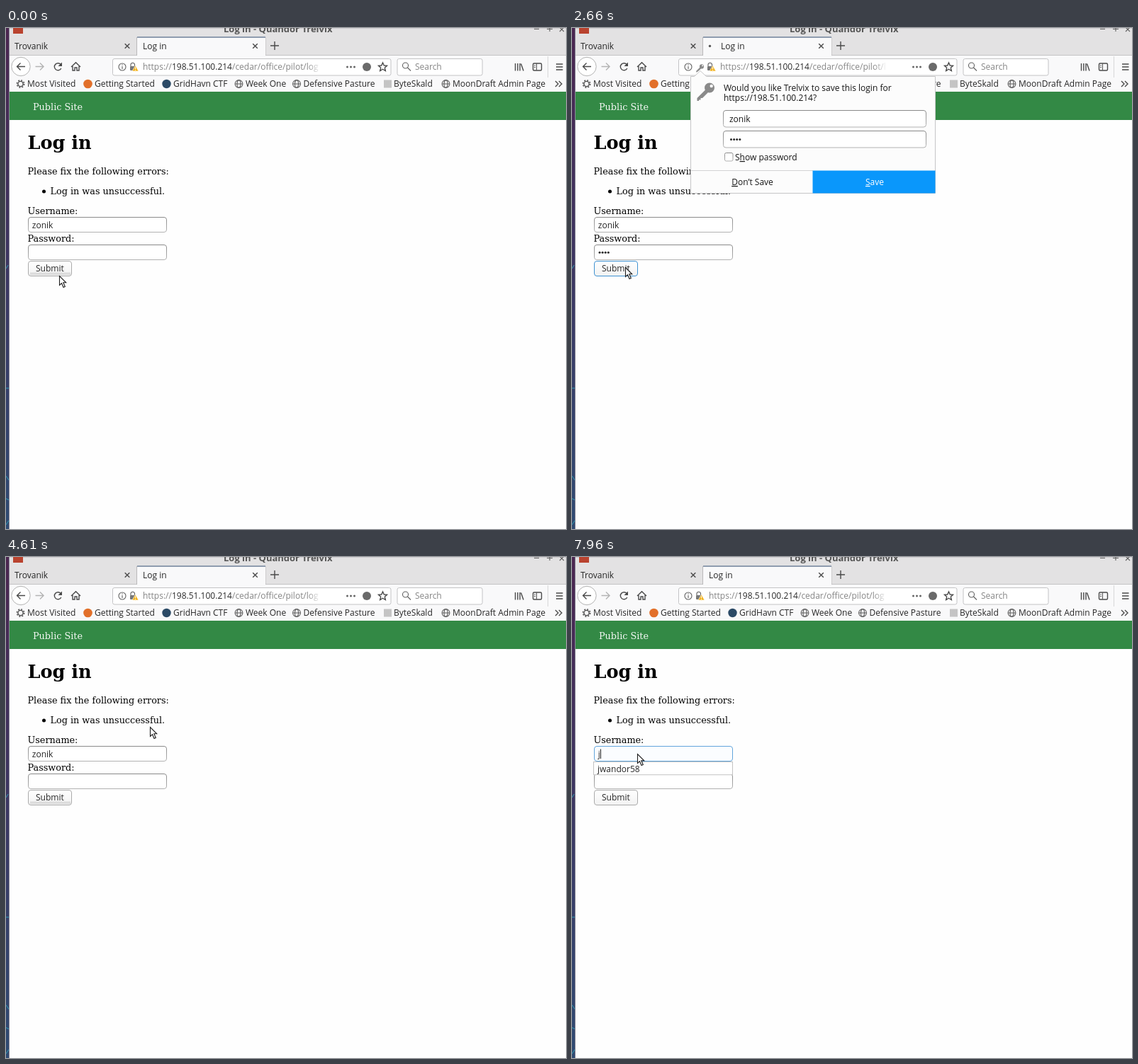
An HTML page that plays this animation: 790 px wide and 708 px high, repeating every 8000 ms.

```html
<!DOCTYPE html>
<html lang="en">
<head>
<meta charset="utf-8">
<title>Log in</title>
<style>
  html, body { margin: 0; width: 100%; height: 100%; overflow: hidden; background: #fefefe; }
  svg { display: block; width: 100%; height: 100%; }
  text { font: 12px "Open Sans", "Noto Sans", sans-serif; fill: #262626; white-space: pre; }
  .title { font-size: 13px; font-weight: 700; fill: #555; }
  .page text { font: 12.8px "DejaVu Serif", serif; fill: #000; }
  .page .h1 { font-size: 25.6px; font-weight: bold; }
  .page .ui { font: 12px "Open Sans", "Noto Sans", sans-serif; fill: #262626; }
  .page .nav { fill: #f4f8f4; }
  #prompt text { fill: #161616; }
  #prompt .light { fill: #fff; }
  .icon { fill: none; stroke: #4a4a4a; stroke-width: 1.4; }
  .thin { fill: none; stroke: #5f5f5f; stroke-width: 1.1; }
  .pale { stroke: #b4b4b4; }
  .box { fill: #fff; stroke: url(#rim); }
  .box.on { fill: #fbfdff; stroke: #62a5dc; }
  text.dim { fill: #858585; }
  .host { fill: #2a2a2a; }
  .u { text-decoration: underline; }
  .caret { stroke: #222; }
</style>
</head>
<body>
<svg viewBox="0 0 790 708">
  <defs>
    <linearGradient id="desk" x2="0" y2="1">
      <stop offset="0" stop-color="#4b2650"/><stop offset=".45" stop-color="#3d3561"/><stop offset="1" stop-color="#2f4a72"/>
    </linearGradient>
    <linearGradient id="fade"><stop offset="0" stop-color="#fff" stop-opacity="0"/><stop offset="1" stop-color="#fff"/></linearGradient>
    <linearGradient id="btn" x2="0" y2="1"><stop offset="0" stop-color="#fff"/><stop offset="1" stop-color="#f2f2f2"/></linearGradient>
    <linearGradient id="rim" x2="0" y2="1"><stop offset="0" stop-color="#8a8a8a"/><stop offset="1" stop-color="#b2b2b2"/></linearGradient>
    <g id="globe" class="thin">
      <circle r="5.4"/><ellipse rx="2.5" ry="5.4"/><path d="M-5.4 0H5.4"/>
    </g>
    <path id="close" class="icon" d="M-3.3 -3.3 3.3 3.3M-3.3 3.3 3.3 -3.3"/>
    <g id="key" fill="#8a8a8a">
      <path fill-rule="evenodd" d="M10 1a7 7 0 1 1 14 0a7 7 0 1 1 -14 0M17.5 -1.5a2.2 2.2 0 1 0 4.4 0a2.2 2.2 0 1 0 -4.4 0"/>
      <path d="M12 3 15.5 7 7 15.5H4.5V18H2V19.5H-.5V15.5Z"/>
    </g>
  </defs>

  <rect width="790" height="708" fill="#fefefe"/>

  <!-- window frame and tabs -->
  <rect x="4" width="786" height="39" fill="#e3e2e3"/>
  <path d="M4 .5H790" stroke="#cfcdd0"/>
  <text x="307" y="6" class="title">Log in - Quandor Trelvix</text>
  <rect x="10" y="0" width="14" height="8" fill="#b9432f"/>
  <path class="thin" d="M745 1.5H752M763 1.5H771M767 -2V5M781 -1 787 5M787 -1 781 5"/>
  <path d="M5 38.5H790" stroke="#c4c3c5"/>
  <path d="M184.5 39V13M366 39V13" stroke="#b9b8ba"/>
  <rect x="185" y="12" width="181" height="28" fill="#f9f9fa"/>
  <rect x="185" y="12" width="181" height="2" fill="#8f9caf"/>
  <text x="12" y="30">Trovanik</text>
  <text id="tab" x="193" y="30">Log in</text>
  <circle id="spin" cy="25.5" r="1.7" fill="#555"/>
  <use href="#close" x="171" y="25.5"/><use href="#close" x="351.5" y="25.5"/>
  <path class="icon" d="M373 25H385M379 19V31"/>

  <!-- toolbar -->
  <path d="M5 39H185V40H366V39H790V90H5Z" fill="#f9f9fa"/>
  <circle cx="21" cy="54.5" r="13.2" fill="#fff" stroke="#b3b3b3"/>
  <path class="icon" d="M27 54.5H15.5M20.5 49.5 15.5 54.5 20.5 59.5"/>
  <path class="icon pale" d="M41.5 54.5H53M48 49.5 53 54.5 48 59.5"/>
  <path class="icon" d="M77.5 52A5 5 0 1 0 77.8 57"/><path d="M79 48.5V54H73.5Z" fill="#4a4a4a"/>
  <path class="icon" d="M92 55 98.5 48.8 105 55M94 54V60H97V56H100V60H103V54"/>
  <rect x="150.5" y="43.5" width="392.5" height="23.5" rx="2.5" fill="#fff" stroke="#c3c3c5"/>
  <g class="thin"><circle cx="164" cy="55" r="5"/><path d="M164 54V58M164 51.5V52.8"/></g>
  <g id="smallkey" transform="translate(175.5 54) scale(.44)"><use href="#key"/></g>
  <g id="url">
    <path d="M176 54V51.5A2.8 2.8 0 0 1 181.5 51.5V54" class="thin"/>
    <rect x="175" y="54" width="8" height="6" rx="1" fill="#777"/>
    <path d="M182.5 53 187 61H178Z" fill="#f2b31f" stroke="#fff" stroke-width=".6"/>
    <path d="M182.5 55.5V58M182.5 59V60" stroke="#fff"/>
    <text x="193" y="59.2" class="dim">https://<tspan class="host">198.51.100.214</tspan>/cedar/office/pilot/log</text>
  </g>
  <rect x="426" y="45" width="18" height="20" fill="url(#fade)"/><rect x="444" y="45" width="34" height="20" fill="#fff"/>
  <g fill="#666"><circle cx="481.5" cy="55" r="1.5"/><circle cx="486.5" cy="55" r="1.5"/><circle cx="491.5" cy="55" r="1.5"/></g>
  <circle cx="509" cy="55" r="6" fill="#6a6a6a"/>
  <path class="icon" d="M531.5 49 533.3 53 537.5 53.4 534.3 56.2 535.3 60.5 531.5 58.2 527.7 60.5 528.7 56.2 525.5 53.4 529.7 53Z"/>
  <rect x="552" y="43.5" width="120" height="23.5" rx="2.5" fill="#fff" stroke="#c3c3c5"/>
  <g class="thin"><circle cx="563.5" cy="53" r="4"/><path d="M566.5 56 571 60.5"/></g>
  <text x="577" y="59.2" class="dim">Search</text>
  <path class="icon" d="M718.5 50V60.5M721.8 50V60.5M725 50V60.5M726.5 50.5 730 60.5"/>
  <rect class="icon" x="743.5" y="50" width="12" height="10" rx="1.5"/><path class="thin" d="M748.5 50V60M745 53H747M745 55.5H747"/>
  <path d="M764.5 40V70" stroke="#d8d8d9"/>
  <path class="icon" d="M776 51H785.5M776 55H785.5M776 59H785.5"/>
  <g id="marks">
    <circle class="icon" cx="20.5" cy="79" r="3.6"/>
    <circle class="icon" cx="20.5" cy="79" r="5.2" stroke-dasharray="2 2.08"/>
    <circle cx="115.5" cy="79" r="6.3" fill="#e2702a"/>
    <circle cx="226.5" cy="79" r="6.2" fill="#2b4a66"/>
    <rect x="533" y="73.5" width="11" height="11" fill="#c4c4c4"/>
    <use href="#globe" x="328.5" y="79"/><use href="#globe" x="410" y="79"/><use href="#globe" x="620.5" y="79"/>
    <path class="icon" d="M775 75 779 79 775 83M780 75 784 79 780 83"/>
  </g>

  <!-- page -->
  <rect x="5" y="90" width="785" height="40" fill="#338945"/>
  <g class="page">
    <text x="38" y="115.5" class="nav">Public Site</text>
    <text x="30.5" y="171" class="h1">Log in</text>
    <text x="30.5" y="207">Please fix the following errors:</text>
    <circle cx="53.5" cy="231" r="2.5"/>
    <text x="62.5" y="235">Log in was unsuccessful.</text>
    <text x="30.5" y="263">Username:</text>
    <text x="30.5" y="301.5">Password:</text>
    <rect id="userBox" class="box" x="31.5" y="267.5" width="195" height="21" rx="3.5"/>
    <rect id="passBox" class="box" x="31.5" y="306.5" width="195" height="21" rx="3.5"/>
    <text id="user" class="ui" x="36.8" y="283"></text>
    <g id="dots" fill="#2a2a2a"></g>
    <path id="caret" class="caret"/>
    <rect id="submit" x="31.5" y="329.5" width="61" height="21" rx="3.5"/>
    <rect id="bar" x="34" y="345.5" width="57" height="3.5" fill="#dcdcdc"/>
    <text class="ui" x="42" y="344">Submit</text>
    <g id="list"></g>
  </g>

  <!-- save prompt -->
  <g id="prompt">
    <path d="M167.5 68.5H172.5L181 60.5 189.5 68.5H512.5V233.5H167.5Z" fill="#fcfcfc" stroke="#c6c6c7"/>
    <use href="#key" x="177" y="83.5"/>
    <text x="214" y="89">Would you like Trelvix to save this login for</text>
    <text x="214" y="102.7">https://198.51.100.214?</text>
    <rect class="box" x="213.5" y="116.5" width="286" height="23.5" rx="3.5"/>
    <rect class="box" x="213.5" y="145.5" width="286" height="23.5" rx="3.5"/>
    <text x="222" y="132.7">zonik</text>
    <g id="savedDots" fill="#2a2a2a"></g>
    <rect class="box" x="215.5" y="176.5" width="11.5" height="11.5" rx="2"/>
    <text x="230" y="187">S<tspan class="u">h</tspan>ow password</text>
    <path d="M168 201.5H340" stroke="#d3d3d4"/>
    <g id="hover">
      <rect x="168" y="201.5" width="172" height="31.5" fill="#e1e1e1"/>
      <rect x="170.5" y="204.5" width="166" height="26" fill="none" stroke="#666" stroke-dasharray="1 1"/>
    </g>
    <rect x="339.5" y="201.5" width="173" height="32" fill="#0a97fb"/>
    <text x="254.5" y="222" text-anchor="middle"><tspan class="u">D</tspan>on’t Save</text>
    <text x="427" y="222" text-anchor="middle" class="light"><tspan class="u">S</tspan>ave</text>
  </g>

  <!-- desktop edge -->
  <rect width="4" height="708" fill="url(#desk)"/>
  <path d="M4.5 0V708" stroke="#8b8a98"/>
  <path d="M0 340 3 335M0 509H4M0 633 4 639M0 665 4 667M0 702 4 696" stroke="#2f9fb5" fill="none"/>

  <path id="arrow" d="M.5 .5V13.5L3.5 10.7 6 16.5 8.3 15.5 5.8 9.8H9.7Z" fill="#fff" stroke="#1c1c1c" stroke-width="1.1"/>
  <g id="beam" fill="none">
    <path d="M-3 -6H3M-3 6H3M0 -6V6" stroke="#222" stroke-width="2.8"/>
    <path d="M-3 -6H3M-3 6H3M0 -6V6" stroke="#fff" stroke-width=".8"/>
  </g>
</svg>
<script>
const LOOP = 8000;
const el = id => document.getElementById(id);
const show = (id, on) => el(id).style.display = on ? '' : 'none';
const move = (id, x, y) => el(id).setAttribute('transform', `translate(${x} ${y})`);

const marks = [
  [30, 'Most Visited'], [125, 'Getting Started'], [236, 'GridHavn CTF'], [338, 'Week One'],
  [419.5, 'Defensive Pasture'], [547, 'ByteSkald'], [630, 'MoonDraft Admin Page']
];
el('marks').innerHTML += marks.map(([x, name]) => `<text x="${x}" y="83.3">${name}</text>`).join('');

const dots = (n, x, y) =>
  Array.from({ length: n }, (_, i) => `<circle cx="${x + 4.1 * i}" cy="${y}" r="1.5"/>`).join('');
el('savedDots').innerHTML = dots(4, 224.5, 157.5);

const menu = rows => {
  if (!rows.length) return '';
  const height = 2 + 16.25 * rows.length;
  return `<rect x="30.5" y="289.5" width="196" height="${height}" fill="#fff" stroke="#c2c2c2"/>` +
    rows.map((r, i) => `<text class="ui" x="36" y="${303.5 + 16.25 * i}">${r}</text>`).join('');
};

const arrow = (x, y) => ({ x, y, beam: false });
const beam = (x, y) => ({ x, y, beam: true });
const few = ['zonik', 'zonika', 'zonith', 'zonar'];
const many = [...few, 'zofin'];

// [start ms, what changes]
const steps = [
  [0, { ...arrow(75, 350), user: 'zonik', pass: 0, focus: '', bar: true, list: [], prompt: false, hover: false, spin: 0 }],
  [410, beam(94, 322)],
  [550, beam(96, 318.5)],
  [670, { focus: 'pass' }],
  [1660, { pass: 1 }],
  [1820, { pass: 3 }],
  [1960, { pass: 4 }],
  [2120, { ...arrow(81, 333), bar: false }],
  [2260, arrow(75, 338)],
  [2380, { focus: 'submit', down: true }],
  [2500, { down: false }],
  [2660, { prompt: true, spin: 194.5 }],
  [2800, { spin: 200 }],
  [2920, { spin: 0, pass: 0, focus: '', bar: true }],
  [3190, arrow(82, 326)],
  [3310, arrow(118, 290)],
  [3430, arrow(170, 252)],
  [3560, { ...arrow(218, 226), hover: true }],
  [3680, arrow(231, 221)],
  [3830, { prompt: false, hover: false }],
  [4220, arrow(208, 236)],
  [4340, arrow(203, 229)],
  [4610, arrow(203, 240)],
  [4730, arrow(203, 229)],
  [5160, beam(88.5, 300)],
  [5410, beam(90.5, 291)],
  [5550, beam(94, 280.5)],
  [5800, { focus: 'user' }],
  [6610, { ...arrow(92, 278), user: 'zoni', list: few, bar: false }],
  [6740, { user: 'zon' }],
  [6880, { user: 'zo', list: many }],
  [7010, { user: 'z' }],
  [7150, { ...beam(94, 280.5), user: '', list: [] }],
  [7810, { user: 'j' }],
  [7960, { ...arrow(92, 278), list: ['jwandor58'] }]
];

function draw(s) {
  show('arrow', !s.beam);
  show('beam', s.beam);
  move(s.beam ? 'beam' : 'arrow', s.x, s.y);

  el('user').textContent = s.user;
  el('dots').innerHTML = dots(s.pass, 39, 317.3);
  el('userBox').classList.toggle('on', s.focus === 'user');
  el('passBox').classList.toggle('on', s.focus === 'pass');
  const inUser = s.focus === 'user';
  const width = inUser ? (s.user && el('user').getComputedTextLength()) : 4.1 * s.pass;
  const caretX = Math.floor(37 + +width) + .5;
  el('caret').setAttribute('d', `M${caretX} ${inUser ? 271.5 : 310.5}v13.5`);
  show('caret', inUser || s.focus === 'pass');

  el('submit').setAttribute('fill', s.down ? '#e2e2e2' : 'url(#btn)');
  el('submit').setAttribute('stroke', s.focus === 'submit' ? '#3f92d2' : '#ababab');
  show('bar', s.bar);
  el('list').innerHTML = menu(s.list);

  show('prompt', s.prompt);
  show('smallkey', s.prompt);
  show('hover', s.hover);
  move('url', s.prompt ? 16 : 0, 0);
  show('spin', s.spin);
  el('spin').setAttribute('cx', s.spin);
  el('tab').setAttribute('x', s.spin ? 210 : 193);
}

const start = performance.now();
let last = -1;
function tick() {
  const t = (performance.now() - start) % LOOP;
  const past = steps.filter(([at]) => at <= t);
  if (past.length !== last) {
    last = past.length;
    draw(Object.assign({}, ...past.map(p => p[1])));
  }
  requestAnimationFrame(tick);
}
tick();
</script>
</body>
</html>
```
